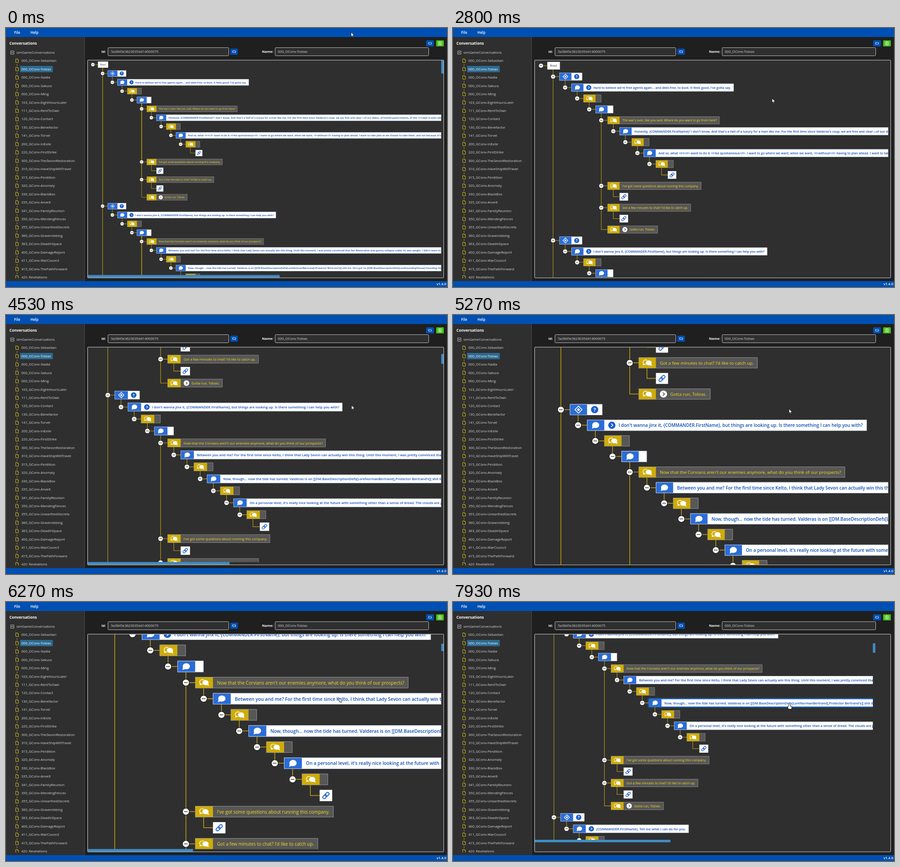
An HTML page with a canvas that plays this animation: 975x574 px, repeating every 8000 ms.

```html
<!DOCTYPE html>
<html lang="en">
<head>
<meta charset="utf-8">
<title>Conversation editor</title>
<style>
  html, body { margin: 0; width: 100%; height: 100%; overflow: hidden; background: #1f1f1f; }
  canvas { display: block; }
</style>
</head>
<body>
<canvas id="stage" width="975" height="574"></canvas>
<script>
const c = document.getElementById('stage').getContext('2d');
const LOOP = 8000, PX = 0.5765;
const BAR = '#0050b3', BLUE = '#2b6cd6', GOLD = '#cfac08', LINE = '#c4a30c', PANEL = '#2f2f2f';
const VIEW = { x: 181, y: 71.4, w: 787, h: 482 };

const files = `000_OConv-Sebastian 000_OConv-Tobias 000_OConv-Nadia 000_OConv-Sakura 000_OConv-Ming
103_GConv-EightHoursLater 111_GConv-RentToOwn 120_GConv-Contact 130_GConv-Benefactor 141_GConv-Torvel
200_GConv-InExile 220_GConv-FirstStrike 300_GConv-TheSevonRestoration 310_GConv-HaveShipWillTravel
315_GConv-Perdition 320_GConv-Anomaly 330_GConv-BlackBox 335_GConv-Anvelt 341_GConv-FamilyReunion
350_GConv-MendingFences 355_GConv-UnearthedSecrets 360_GConv-Graverobbing 363_GConv-DeadInSpace
400_GConv-DamageReport 411_GConv-WarCouncil 415_GConv-ThePathForward 420_Revelations`.split(/\s+/);

// [level, kind, text, has arrow]; kinds: root, cond, node, reply, link
const closing = [
  [5, 'reply', "I've got some questions about running this company."], [6, 'link'],
  [5, 'reply', "Got a few minutes to chat? I'd like to catch up."], [6, 'link'],
  [5, 'reply', 'Gotta run, Tobias.', 1]
];
const rows = [
  [0, 'root', 'Root'],
  [1, 'cond'],
  [2, 'node', "Hard to believe we're free agents again... and debt-free, to boot. It feels good, I've gotta say.", 1],
  [3, 'reply'], [4, 'node'],
  [5, 'reply', "The war's over, like you said. Where do you want to go from here?"],
  [6, 'node', "Honestly, {COMMANDER.FirstName}? I don't know. And that's a hell of a luxury for a man like me. For the first time since Valderas's coup, we are free and clear—of our debts, of hostile governments, of the <i>need to plan ahead</i>."],
  [7, 'reply'],
  [8, 'node', 'And so, what <i>I</i> want to do is <i>be spontaneous</i>. I want to go where we want, when we want, <i>without</i> having to plan ahead. I want to take jobs as we choose to take them, and not because of debts.'],
  [9, 'reply'], [10, 'link'],
  ...closing,
  [1, 'cond'],
  [2, 'node', "I don't wanna jinx it, {COMMANDER.FirstName}, but things are looking up. Is there something I can help you with?", 1],
  [3, 'reply'], [4, 'node'],
  [5, 'reply', "Now that the Corvians aren't our enemies anymore, what do you think of our prospects?"],
  [6, 'node', "Between you and me? For the first time since Kelto, I think that Lady Sevon can actually win this thing. Until this moment, I was pretty convinced that her Restoration was gonna collapse under its own weight. I didn't want to say it."],
  [7, 'reply'],
  [8, 'node', "Now, though... now the tide has turned. Valderas is on [[DM.BaseDescriptionDefs[LoreNormanBertrand],Protector Bertrand's]] shit list. He's got no [[DM.BaseDescriptionDefs[LoreFoundingHouse],Founding House]] behind him."],
  [9, 'reply'],
  [10, 'node', "On a personal level, it's really nice looking at the future with something other than a sense of dread. The clouds are parting."],
  [11, 'reply'], [12, 'link'],
  ...closing,
  [1, 'cond'],
  [2, 'node', '{COMMANDER.FirstName}. Tell me what I can do for you.', 1],
  [3, 'reply'], [4, 'node']
];
const HOVERED = 23;

// Timeline
const series = (start, gap, n) => Array.from({ length: n }, (_, i) => start + i * gap);
const zoomIns = [2200, 2470, 2600, 2740, 2930, 3130, ...series(4670, 90, 8)];
const zoomOuts = [...series(6930, 66, 8), 7930];
const barsHidden = [[2200, 3330], [4670, 5470], [6930, 7730]];
const scrollKeys = [[3070, 0], [3130, 2.2], [4130, 2.2], [4530, 500], [5740, 500], [6000, 584], [6270, 700]];
const mouseKeys = [
  [130, 763, 9.5], [330, 763, 9], [670, 712, 108], [870, 712, 108], [1070, 712, 147], [1400, 712, 147],
  [1870, 705.5, 156], [3270, 705.5, 156], [3870, 754.5, 187], [4130, 764, 200], [4670, 764, 200],
  [5470, 736, 211], [5600, 736.5, 212.5], [6930, 736.5, 212.5], [7200, 742, 233.5], [7530, 744, 226]
];
const passed = (times, t) => times.filter(k => k <= t).length;
function at(keys, t, n = 1) {
  const i = keys.findIndex(k => k[0] > t);
  if (i < 0) return keys[keys.length - 1][n];
  if (!i) return keys[0][n];
  const a = keys[i - 1], b = keys[i];
  return a[n] + (b[n] - a[n]) * (t - a[0]) / (b[0] - a[0]);
}

// Drawing helpers
function rect(x, y, w, h, fill) { c.fillStyle = fill; c.fillRect(x, y, w, h); }
function frame(x, y, w, h, color, lw = 1) { c.strokeStyle = color; c.lineWidth = lw; c.strokeRect(x, y, w, h); }
function round(x, y, w, h, r, fill, stroke, lw = 1) {
  c.beginPath(); c.roundRect(x, y, w, h, r); paint(fill, stroke, lw);
}
function paint(fill, stroke, lw = 1) {
  if (fill) { c.fillStyle = fill; c.fill(); }
  if (stroke) { c.strokeStyle = stroke; c.lineWidth = lw; c.stroke(); }
}
function poly(pts, fill, stroke, lw, open) {
  c.beginPath();
  pts.forEach(([x, y]) => c.lineTo(x, y));
  if (!open) c.closePath();
  paint(fill, stroke, lw);
}
function oval(x, y, rx, ry, fill, stroke, lw) {
  c.beginPath(); c.ellipse(x, y, rx, ry, 0, 0, 7); paint(fill, stroke, lw);
}
function font(size, weight = 400) { c.font = `${weight} ${size}px "Open Sans", "Noto Sans", sans-serif`; }
function text(s, x, y, size, color, weight) {
  font(size, weight); c.fillStyle = color; c.fillText(s, x, y + size * 0.36);
}
const diamond = (x, y, r) => [[x, y - r], [x + r, y], [x, y + r], [x - r, y]];

function swapButton(x, y, w) {
  round(x, y, w, 13.5, 1.5, BAR);
  const m = x + w / 2, n = y + 6.7;
  frame(m - 3, n - 2, 6, 4, '#fff', 0.7);
  poly([[m + 1.8, n + 0.2], [m + 4.2, n + 0.2], [m + 3, n + 1.6]], '#fff');
  poly([[m - 1.8, n - 0.2], [m - 4.2, n - 0.2], [m - 3, n - 1.6]], '#fff');
}

function chrome(overName) {
  rect(0, 0, 975, 574, '#1f1f1f');
  rect(0, 20, 173, 541, PANEL);
  rect(173, 20, 1, 541, '#505050');
  rect(0, 0, 975, 20, BAR);
  rect(0, 561, 975, 13, BAR);
  text('File', 18, 10.5, 8, '#fff', 600);
  text('Help', 54, 10.5, 8, '#fff', 600);
  text('v1.4.0', 952, 567.5, 7.7, '#fff', 600);
  text('Conversations', 7.5, 34, 8.5, '#fff', 700);

  frame(10.5, 51, 7, 7, '#ccc', 0.9);
  rect(12, 54, 4, 1, '#ddd');
  text('simGameConversations', 23, 54.3, 7.65, '#d6d6d6');
  c.save();
  c.beginPath(); c.rect(0, 60, 173, 495); c.clip();
  files.forEach((name, i) => {
    const y = 72.5 + i * 18.46;
    if (i === 1) round(31, y - 7, 72.5, 14, 1, '#2c6a90');
    poly([[21.5, y - 4], [25.5, y - 4], [27.5, y - 2], [27.5, y + 4], [21.5, y + 4]], null, '#d8b90c', 1);
    poly([[25.2, y - 4], [25.2, y - 1.7], [27.5, y - 1.7]], null, '#d8b90c', 0.7, true);
    rect(24, y + 7.5, 1, 4, '#999');
    text(name, 34, y, 7.65, i === 1 ? '#fff' : '#d6d6d6');
  });
  c.restore();

  swapButton(929, 27.3, 17);
  round(951, 27.3, 17, 13.5, 1.5, '#49c01c');
  round(956, 30.7, 7, 7, 1, null, '#fff', 0.8);
  frame(958, 34, 3, 2, '#fff', 0.7);
  rect(957.7, 31, 2.6, 1.2, '#fff');
  text('Id:', 211, 52.5, 7.7, '#fff', 700);
  round(225.5, 43.5, 267, 18, 2, PANEL, '#d0d0d0', 0.9);
  text('5a3845e3623035d414000075', 232, 52.5, 7.65, '#d6d6d6');
  swapButton(496, 45.7, 16.5);
  text('Name:', 566, 52.5, 7.7, '#fff', 700);
  round(595, 43.5, 339.5, 18, 2, PANEL, overName ? '#177ddc' : '#d0d0d0', 0.9);
  text('000_OConv-Tobias', 601, 52.5, 7.65, '#d6d6d6');
  rect(VIEW.x, VIEW.y, VIEW.w, VIEW.h, PANEL);
}

// Tree, in layout units
const nodeX = level => 45.5 + 44 * level, colX = level => 22.5 + 44 * level, rowY = i => 20 + 40 * i;

function bubble(x, y) {
  oval(x, y - 0.5, 9, 7.6, '#fff');
  poly([[x - 8, y + 1], [x - 9.5, y + 8.5], [x - 2, y + 6]], '#fff');
}
function bubbles(x, y) {
  oval(x - 4, y - 1.5, 7, 6, null, '#fff', 1.6);
  poly([[x - 10, y + 2], [x - 11, y + 6.5], [x - 5, y + 4.5]], '#fff');
  oval(x + 3.5, y, 8.7, 7.4, GOLD);
  oval(x + 3.5, y, 7.6, 6.3, '#fff');
  poly([[x + 10, y + 2], [x + 12, y + 8], [x + 5, y + 5.5]], '#fff');
}
function chain(x, y) {
  c.save(); c.translate(x, y); c.rotate(-Math.PI / 4);
  round(-9.5, -3.5, 11, 7, 3.5, null, '#1c5fcb', 2);
  round(-1.5, -3.5, 11, 7, 3.5, null, '#1c5fcb', 2);
  c.restore();
}
function toggle(x, y) {
  oval(x, y, 8.4, 8.4, '#fff', '#111', 1.2);
  rect(x - 4.5, y - 0.8, 9, 1.6, '#333');
}

function drawNode([level, kind, label, arrow], i, hover) {
  const x = nodeX(level), y = rowY(i), top = y - 14;
  if (kind === 'root') {
    rect(x, top, 46, 28, '#fff');
    text(label, x + 10, y, 11.45, '#333');
    return;
  }
  if (kind === 'link') {
    rect(x, top, 31, 28, '#fff');
    chain(x + 15.5, y);
    return;
  }
  const reply = kind === 'reply', weight = reply ? 500 : 600, size = reply ? 11.3 : 11.45;
  const textX = arrow ? 80.3 : 54;
  let w = kind === 'cond' ? 83 : 64.6;
  if (label) {
    font(size, weight);
    w = label.length > 120 ? 3000 : textX + c.measureText(label).width + 10;
  }
  if (hover) { c.shadowColor = '#1890ff'; c.shadowBlur = 5; }
  rect(x, top, w, 28, reply ? '#575757' : '#fff');
  c.shadowBlur = 0;
  rect(x, top, 44, 28, reply ? GOLD : BLUE);
  frame(x + 0.5, top + 0.5, w - 1, 27, hover ? '#1677e0' : reply ? '#999' : '#c8d4e8', hover ? 2 : 1);
  if (kind === 'cond') {
    poly(diamond(x + 22, y, 9), null, '#fff', 2);
    poly(diamond(x + 22, y, 4), '#fff');
    oval(x + 63.3, y, 9.3, 9.3, '#1c5fcb');
    c.textAlign = 'center';
    text('?', x + 63.3, y, 13, '#fff', 700);
    c.textAlign = 'left';
  } else if (reply) bubbles(x + 22, y);
  else bubble(x + 22, y);
  if (arrow) {
    oval(x + 63.3, y, 9.3, 9.3, reply ? '#fff' : '#1c5fcb');
    poly([[x + 61.5, y - 4], [x + 66, y], [x + 61.5, y + 4]], null, reply ? '#444' : '#fff', 1.8, true);
  }
  if (label) text(label, x + textX, y + 0.5, size, reply ? '#fadb14' : '#0b4db5', weight);
}

function drawTree(zoom, layout, scroll, bars, hover) {
  const k = zoom / layout, s = zoom * PX;
  const right = VIEW.w * k, bottom = VIEW.h * k, thick = 5.8 * k;
  c.save();
  c.beginPath(); c.rect(VIEW.x, VIEW.y, VIEW.w, VIEW.h); c.clip();
  c.translate(VIEW.x, VIEW.y);
  c.save();
  c.beginPath(); c.rect(0, 0, right - thick, bottom - (bars ? thick : 0)); c.clip();
  c.scale(s, s);
  c.translate(0, -scroll);
  c.beginPath();
  c.moveTo(colX(1), 34); c.lineTo(colX(1), 4000);
  rows.forEach(([level], i) => {
    const y = rowY(i), x = colX(level);
    if (i) {
      let p = i - 1;
      while (rows[p][0] >= level) p--;
      c.moveTo(x, rowY(p) + 14);
      c.lineTo(x, y);
    } else c.moveTo(x, y);
    c.lineTo(nodeX(level), y);
  });
  paint(null, LINE, 1.7);
  rows.forEach((row, i) => {
    drawNode(row, i, hover && i === HOVERED);
    if (rows[i + 1] && rows[i + 1][0] > row[0]) toggle(colX(row[0]), rowY(i));
  });
  c.restore();
  if (bars) {
    const thumbW = 207.8 / (layout * PX) * k, thumbH = 14.5 / (layout * PX) * k;
    round(0, bottom - thick, thumbW, thick, 1, '#3f8dc6');
    round(right - thick, scroll * 0.0301 * k, thick, thumbH, 1, '#3f8dc6');
  }
  c.restore();
  round(180.5, 71.2, 787.2, 482.6, 1, null, '#d9d9d9');
}

function drawMouse(x, y, hand) {
  c.save();
  c.translate(x, y);
  if (hand) {
    c.beginPath();
    c.roundRect(-1.2, 0, 2.4, 8, 1.2);
    c.roundRect(-3, 4.4, 7.6, 6.6, 2);
    paint(null, '#000', 1.5);
    paint('#fff');
    for (const fx of [1.2, 2.9]) rect(fx, 4.6, 0.6, 2.6, '#555');
  } else {
    poly([[0, 0], [0, 9.5], [2.2, 7.5], [3.8, 11], [5.2, 10.4], [3.7, 7], [6.8, 7]], '#fff', '#000', 0.7);
  }
  c.restore();
}

function draw() {
  const t = performance.now() % LOOP;
  const zoom = 0.85 + 0.05 * (passed(zoomIns, t) - passed(zoomOuts, t));
  const layout = t >= 6930 ? 1.15 : zoom;
  const bars = !barsHidden.some(([a, b]) => t >= a && t < b);
  const mx = at(mouseKeys, t, 1), my = at(mouseKeys, t, 2), hover = t >= 7400;
  chrome(my > 43 && my < 62);
  drawTree(zoom, layout, at(scrollKeys, t), bars, hover);
  drawMouse(mx, my, hover);
  requestAnimationFrame(draw);
}
draw();
</script>
</body>
</html>
```
